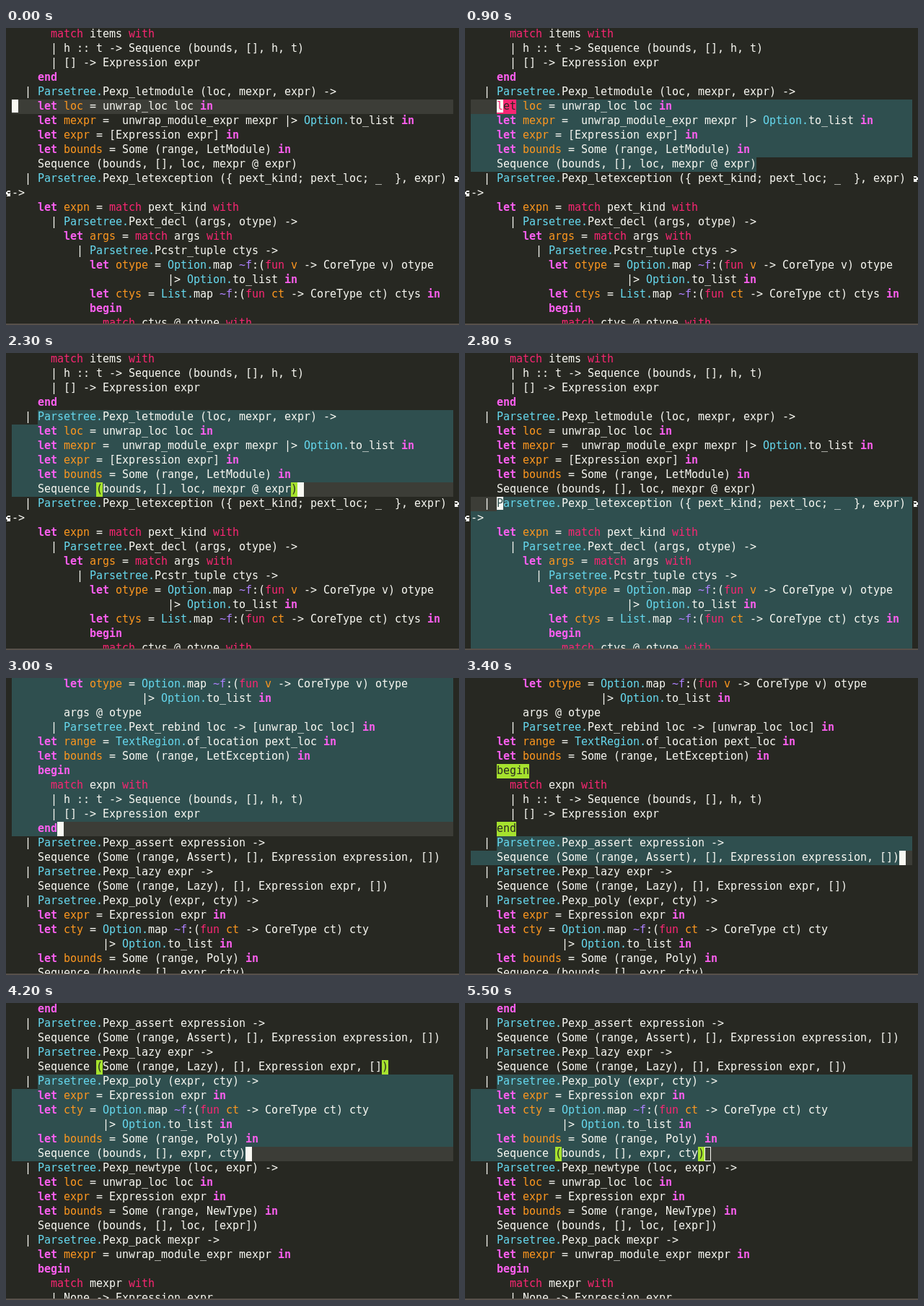
Recreate the animation shown at these times as an HTML page. Size 628x411 px, loop 5.7 s.

```html
<!DOCTYPE html>
<html lang="en">
<head>
<meta charset="utf-8">
<title>Structural selection in an editor</title>
<style>
  html, body { margin: 0; width: 100%; height: 100%; overflow: hidden; background: #272822; }
  #stage { position: relative; width: 628px; height: 411px; overflow: hidden; background: #272822; }
  #window { position: absolute; left: 0; top: 0; width: 628px; height: 409px; overflow: hidden; }
  #modeline { position: absolute; left: 0; top: 409px; width: 628px; height: 2px; background: #57504a; }
  #view {
    position: absolute; left: 8px; color: #f8f8f2;
    font: 15px/18px "DejaVu Sans Mono", monospace;
    letter-spacing: calc(9px - 1ch);
    font-variant-ligatures: none;
  }
  #view > * { position: absolute; white-space: pre; }
  .key { color: #fd5ff0; font-weight: bold; }
  .flow { color: #f92672; }
  .mod { color: #66d9ef; }
  .var { color: #fd971f; }
  .label { color: #ae81ff; }
  .line { background: #3c3d37; }
  .region { background: #2f4f4f; }
  .match { background: #a6e22e; color: #272822; }
  .mismatch { background: #f92672; color: #272822; }
  .solid { background: #f8f8f2; }
  .hollow { box-sizing: border-box; border: 1px solid #f8f8f2; }
  .wrap { fill: #f8f8f2; }
</style>
</head>
<body>
<div id="stage">
  <div id="window"><div id="view"></div></div>
  <div id="modeline"></div>
</div>
<script>
const CELL = 9, ROW = 20, COLS = 68, LOOP = 5700;

const upper = `
      match items with
      | h :: t -> Sequence (bounds, [], h, t)
      | [] -> Expression expr
    end
  | Parsetree.Pexp_letmodule (loc, mexpr, expr) ->
    let loc = unwrap_loc loc in
    let mexpr =  unwrap_module_expr mexpr |> Option.to_list in
    let expr = [Expression expr] in
    let bounds = Some (range, LetModule) in
    Sequence (bounds, [], loc, mexpr @ expr)
  | Parsetree.Pexp_letexception ({ pext_kind; pext_loc; _  }, expr)
->
    let expn = match pext_kind with
      | Parsetree.Pext_decl (args, otype) ->
        let args = match args with
          | Parsetree.Pcstr_tuple ctys ->
            let otype = Option.map ~f:(fun v -> CoreType v) otype
                        |> Option.to_list in
            let ctys = List.map ~f:(fun ct -> CoreType ct) ctys in
            begin
              match ctys @ otype with`.split("\n").slice(1);

const lower = `
        let otype = Option.map ~f:(fun v -> CoreType v) otype
                    |> Option.to_list in
        args @ otype
      | Parsetree.Pext_rebind loc -> [unwrap_loc loc] in
    let range = TextRegion.of_location pext_loc in
    let bounds = Some (range, LetException) in
    begin
      match expn with
      | h :: t -> Sequence (bounds, [], h, t)
      | [] -> Expression expr
    end
  | Parsetree.Pexp_assert expression ->
    Sequence (Some (range, Assert), [], Expression expression, [])
  | Parsetree.Pexp_lazy expr ->
    Sequence (Some (range, Lazy), [], Expression expr, [])
  | Parsetree.Pexp_poly (expr, cty) ->
    let expr = Expression expr in
    let cty = Option.map ~f:(fun ct -> CoreType ct) cty
              |> Option.to_list in
    let bounds = Some (range, Poly) in
    Sequence (bounds, [], expr, cty)
  | Parsetree.Pexp_newtype (loc, expr) ->
    let loc = unwrap_loc loc in
    let expr = Expression expr in
    let bounds = Some (range, NewType) in
    Sequence (bounds, [], loc, [expr])
  | Parsetree.Pexp_pack mexpr ->
    let mexpr = unwrap_module_expr mexpr in
    begin
      match mexpr with
      | None -> Expression expr`.split("\n").slice(1);

// marks: [row, first column, end column, class]
const parens = (row, end) => [[row, 13, 14, "match"], [row, end - 1, end, "match"]];
const letMark = [[5, 4, 7, "mismatch"]];
const blockMarks = [[6, 4, 9, "match"], [10, 4, 7, "match"]];

// Each step changes only the listed parts of the editor state.
// region: [start row, start column, end row, end column]
const steps = [
  { t: 0, text: upper, top: 0, cursor: [5, 0], shape: "solid", ink: "#3c3d37", region: null, marks: [] },
  { t: 100, shape: "" },
  { t: 300, cursor: [5, 4], shape: "solid", ink: "#2f4f4f", region: [5, 4, 5, 28] },
  { t: 400, marks: letMark, ink: "#f92672" },
  { t: 800, region: [5, 4, 9, 44], marks: [], ink: "#2f4f4f" },
  { t: 900, marks: letMark, ink: "#f92672" },
  { t: 1400, shape: "" },
  { t: 1700, cursor: [4, 4], shape: "solid", ink: "#2f4f4f", region: [4, 4, 9, 44] },
  { t: 1800, marks: [] },
  { t: 2100, cursor: [9, 44] },
  { t: 2300, marks: parens(9, 44) },
  { t: 2800, cursor: [10, 4], region: [10, 4, 21, 0], marks: [] },
  { t: 3000, text: lower, cursor: [10, 7], region: [-1, 0, 10, 7] },
  { t: 3100, marks: blockMarks },
  { t: 3400, cursor: [12, 66], region: [11, 4, 12, 66] },
  { t: 3600, marks: parens(12, 66) },
  { t: 3800, cursor: [14, 58], region: [13, 4, 14, 58] },
  { t: 3900, marks: parens(14, 58) },
  { t: 4200, top: 10, cursor: [20, 36], region: [15, 4, 20, 36] },
  { t: 4300, marks: parens(20, 36) },
  { t: 4700, shape: "" },
  { t: 5200, shape: "solid" },
  { t: 5500, shape: "hollow" }
];
const states = [];
for (const step of steps) states.push({ ...states[states.length - 1], ...step });

const token = /(?<var>(?<=\b(?:let|fun) )\w+)|(?<key>\b(?:let|in|begin|end)\b)|(?<flow>\b(?:match|with|fun)\b)|(?<mod>[A-Z]\w*\.)|(?<label>~\w+)/g;
const paint = line => line.replace(token, (word, ...rest) => {
  const groups = rest[rest.length - 1];
  const kind = Object.keys(groups).find(name => groups[name]);
  return `<span class="${kind}">${word}</span>`;
});

const place = (row, col) => `left:${col * CELL}px;top:${row * ROW}px;`;
const box = (kind, row, from, to, text = "", height = ROW, style = "") =>
  `<div class="${kind}" style="${place(row, from)}width:${(to - from) * CELL}px;height:${height}px;${style}">${text}</div>`;

// Curly arrows in the margins where a long line wraps.
const arrow = (x, row, flip) =>
  `<svg class="wrap" width="8" height="8" style="left:${x}px;top:${row * ROW + 6}px;transform:scaleX(${flip})" shape-rendering="crispEdges">
   <path d="M2 0H6V1H7V2H8V5H7V6H6V7H7V8H2V3H3V4H5V3H6V2H2Z"/></svg>`;

const view = document.getElementById("view");

function render({ text, top, cursor: [row, col], shape, ink, region, marks }) {
  let html = box("line", row, 0, COLS);
  if (region) {
    const [r0, c0, r1, c1] = region;
    for (let r = r0; r <= r1; r++)
      html += box("region", r, r === r0 ? c0 : 0, r === r1 ? c1 : COLS);
  }
  text.forEach((line, r) => { html += `<div style="${place(r, 0)}">${paint(line)}</div>`; });
  if (text === upper) html += arrow(COLS * CELL, 10, 1) + arrow(-8, 11, -1);
  for (const [r, from, to, kind] of marks) html += box(kind, r, from, to, text[r].slice(from, to));
  if (shape) {
    const char = text[row][col] || "";
    html += box(shape, row, col, col + 1, char, char ? 18 : ROW, `color:${ink}`);
  }
  view.style.top = -1 - top * ROW + "px";
  view.innerHTML = html;
}

let shown = -1;
const start = performance.now();
function tick() {
  const t = (performance.now() - start) % LOOP;
  let now = states.length - 1;
  while (states[now].t > t) now--;
  if (now !== shown) render(states[shown = now]);
  requestAnimationFrame(tick);
}
tick();
</script>
</body>
</html>
```
